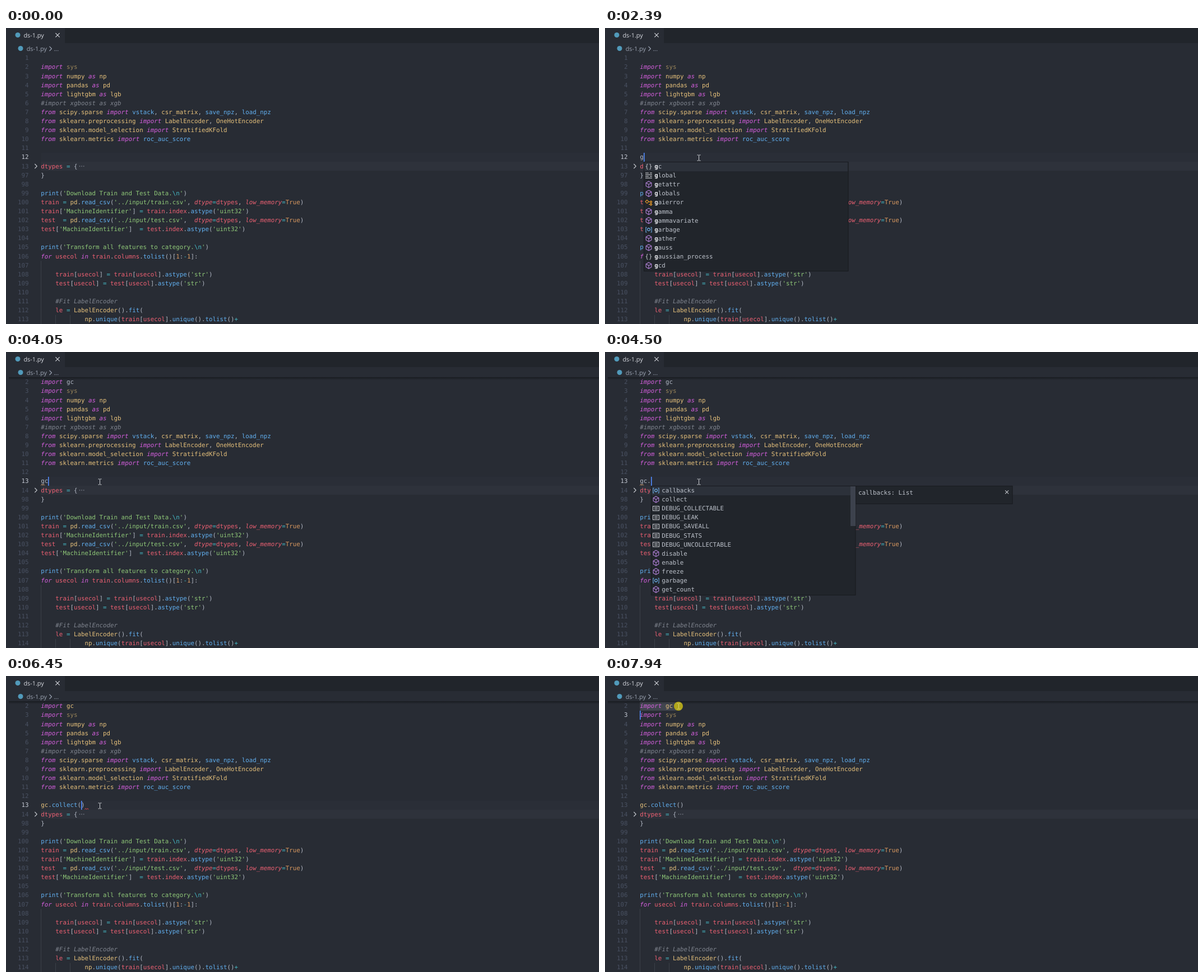
Recreate the animation shown at these times as an HTML page with a canvas. Size 1058 px wide and 529 px high, loop 8000 ms.

```html
<!DOCTYPE html>
<html lang="en">
<head>
<meta charset="utf-8">
<title>Code editor</title>
<style>
  html, body { margin: 0; height: 100%; overflow: hidden; background: #282c34; }
  canvas { display: block; width: 1058px; height: 529px; }
</style>
</head>
<body>
<canvas id="stage" width="1058" height="529"></canvas>
<script>
const c = document.getElementById('stage').getContext('2d');
c.textRendering = 'geometricPrecision';

const LOOP = 8000, W = 1058, H = 529;
const LEFT = 62.3, TOP = 45.9, CHAR = 6.515, ROW = 16.1, BASE = 11.4;
const TYPING_ROW = 11, FOLD_ROW = 12;
const MONO = '10.82px "DejaVu Sans Mono", monospace';
const SANS = '10.8px "Open Sans", sans-serif';
const col = {
  bg: '#282c34', dark: '#21252b', edge: '#181a1f', text: '#b1b7c3', bright: '#c5c8ce', dim: '#495162',
  purple: '#d55fde', yellow: '#e5c07b', blue: '#61afef', red: '#ec6072',
  green: '#8fc878', cyan: '#45b8c4', orange: '#d8985f', note: '#7f848e', faded: '#998459',
};

// Moments of the story, in ms.
const at = {
  move: 370, click: 1270, g: 2000, listA: 2390, docA: 2540, warn: 2940, bulb: 3030,
  accept: 3810, bulbOff: 4050, dot: 4260, listB: 4340, docB: 4500, known: 4650,
  pick: 5580, docPick: 5670, call: 6450, hint: 6530, close: 7460, leave: 7690, reclick: 7860, select: 7940,
};

const code = String.raw`
import sys
import numpy as np
import pandas as pd
import lightgbm as lgb
#import xgboost as xgb
from scipy.sparse import vstack, csr_matrix, save_npz, load_npz
from sklearn.preprocessing import LabelEncoder, OneHotEncoder
from sklearn.model_selection import StratifiedKFold
from sklearn.metrics import roc_auc_score


dtypes = {
}

print('Download Train and Test Data.\n')
train = pd.read_csv('../input/train.csv', dtype=dtypes, low_memory=True)
train['MachineIdentifier'] = train.index.astype('uint32')
test  = pd.read_csv('../input/test.csv',  dtype=dtypes, low_memory=True)
test['MachineIdentifier']  = test.index.astype('uint32')

print('Transform all features to category.\n')
for usecol in train.columns.tolist()[1:-1]:

    train[usecol] = train[usecol].astype('str')
    test[usecol] = test[usecol].astype('str')

    #Fit LabelEncoder
    le = LabelEncoder().fit(
            np.unique(train[usecol].unique().tolist()+`.split('\n');

const words = list => new RegExp(`^(${list.replace(/ /g, '|')})$`);
const keywords = words('import as from for in');
const types = words('numpy np pandas pd lightgbm lgb scipy sparse sklearn preprocessing ' +
  'model_selection metrics csr_matrix LabelEncoder OneHotEncoder StratifiedKFold gc');
const funcs = words('vstack save_npz load_npz roc_auc_score');

const entries = s => s.split(' ').map(e => e.split(':'));
const listA = entries('mod:gc key:global fn:getattr fn:globals cls:gaierror fn:gamma ' +
  'fn:gammavariate var:garbage fn:gather fn:gauss mod:gaussian_process fn:gcd');
const listB = entries('var:callbacks fn:collect const:DEBUG_COLLECTABLE const:DEBUG_LEAK ' +
  'const:DEBUG_SAVEALL const:DEBUG_STATS const:DEBUG_UNCOLLECTABLE fn:disable fn:enable ' +
  'fn:freeze var:garbage fn:get_count');

const rowTop = i => TOP + i * ROW;
const colX = n => LEFT + n * CHAR;
const within = (t, a, b) => t >= a && t < b;
const lerp = (a, b, p) => a + (b - a) * p;

function rect(x, y, w, h, fill) {
  c.fillStyle = fill;
  c.fillRect(x, y, w, h);
}

function frameBox(x, y, w, h, color) {
  c.strokeStyle = color;
  c.lineWidth = 1.1;
  c.strokeRect(x - w / 2, y - h / 2, w, h);
}

function text(s, x, y, fill, font = MONO) {
  c.font = font;
  c.fillStyle = fill;
  c.fillText(s, x, y);
}

function line(x1, y1, x2, y2, color, width = 1.1) {
  c.strokeStyle = color;
  c.lineWidth = width;
  c.beginPath();
  c.moveTo(x1, y1);
  c.lineTo(x2, y2);
  c.stroke();
}

// Regular polygon with its first corner at the top.
function poly(x, y, r, n, color) {
  c.strokeStyle = color;
  c.lineWidth = 1.1;
  c.beginPath();
  for (let i = 0; i < n; i++) {
    const a = 2 * Math.PI * i / n;
    c.lineTo(x + r * Math.sin(a), y - r * Math.cos(a));
  }
  c.closePath();
  c.stroke();
}

function dot(x, y, r, fill) {
  c.fillStyle = fill;
  c.beginPath();
  c.arc(x, y, r, 0, 7);
  c.fill();
}

function cross(x, y, r, color) {
  for (const s of [r, -r]) line(x - r, y - s, x + r, y + s, color);
}

function chevron(x, y, color) {
  for (const s of [4, -4]) line(x - 2, y - s, x + 2, y, color);
}

function panel(x, y, w, h) {
  rect(x, y, w, h, col.edge);
  rect(x + 1, y + 1, w - 2, h - 2, col.dark);
}

function wordColor(w, next, gcKnown) {
  if (w === 'sys') return col.faded;
  if (w === 'g' || w === 'gc' && !gcKnown) return col.text;
  if (keywords.test(w)) return col.purple;
  if (types.test(w)) return col.yellow;
  if (/^\d|True/.test(w)) return col.orange;
  return funcs.test(w) || next === '(' ? col.blue : col.red;
}

function codeLine(s, x, y, gcKnown) {
  for (const m of s.matchAll(/#.*|'[^']*'|\w+|[=+-]|[^\w\s'=+-]/g)) {
    const w = m[0], next = s[m.index + w.length];
    const put = (part, n, color, italic) =>
      text(part, x + n * CHAR, y, color, (italic ? 'italic ' : '') + MONO);
    if (w[0] === '#') put(w, m.index, col.note, true);
    else if (w[0] === "'") {
      let n = m.index;
      for (const part of w.split(/(\\n)/)) {
        put(part, n, part === '\\n' ? col.cyan : col.green);
        n += part.length;
      }
    }
    else if (/\w/.test(w))
      put(w, m.index, wordColor(w, next, gcKnown), keywords.test(w) || next === '=');
    else put(w, m.index, /[=+-]/.test(w) ? col.cyan : col.text);
  }
}

const icons = {
  mod: (x, y) => text('{}', x - CHAR, y + 4, col.bright),
  key(x, y) {
    for (let i = 0; i < 4; i++) {
      rect(x - 6, y - 5 + i * 3, i % 2 ? 12 : 6, 1.2, col.bright);
      if (i % 2 === 0) rect(x + 2, y - 5 + i * 3, 4, 1.2, col.bright);
    }
  },
  fn(x, y) {
    const color = '#b180d7';
    poly(x, y, 5.6, 6, color);
    for (let i = 0; i < 3; i++) {
      const a = 2 * Math.PI * i / 3;
      line(x, y, x + 5.6 * Math.sin(a), y + 5.6 * Math.cos(a), color);
    }
  },
  cls(x, y) {
    const color = '#ee9d28';
    poly(x - 3, y - 1.5, 3, 4, color);
    for (const dy of [-1, 3.5]) {
      poly(x + 4, y + dy, 1.8, 4, color);
      line(x, y + dy, x + 2, y + dy, color);
    }
  },
  var(x, y) {
    const color = '#75beff';
    text('[', x - 8, y + 3.5, color);
    text(']', x + 1.5, y + 3.5, color);
    poly(x, y, 2.6, 6, color);
  },
  const(x, y) {
    frameBox(x, y, 11, 8, col.bright);
    for (const dy of [-1.3, 1.3]) line(x - 3, y + dy, x + 3, y + dy, col.bright);
  },
};

function suggestions(x, items, match, selected, thumb) {
  panel(x, 239, 365.5, 196);
  rect(x + 1, 240 + selected * ROW, 363, ROW, '#2c313a');
  items.forEach(([kind, name], i) => {
    const y = rowTop(FOLD_ROW + i) + BASE + .5, tx = x + 19.3;
    icons[kind](x + 9, y - 3.6);
    text(name.slice(0, match), tx, y, '#e8eaee', 'bold ' + MONO);
    text(name.slice(match), tx + match * CHAR, y, '#bcc1ca');
  });
  rect(x + 356, 240, 9, thumb, '#3d424d');
}

function details(x, h) {
  panel(x, 239, 280.5, h);
  cross(x + 270, 250.3, 3, col.bright);
}

function squiggle(n, color) {
  for (let i = 0; i < 4; i++) {
    const x = colX(n) + i * 1.7, s = i % 2 ? 1 : -1;
    line(x, 237.5 - s, x + 1.7, 237.5 + s, color, 1);
  }
}

// The pointer moves in visible steps and slows down as it arrives.
function pointerAt(t) {
  const steps = (from, ms, n) => Math.min(1, (Math.floor((t - from) / ms)) / n);
  const home = [167, 232];
  if (t < at.leave) {
    const p = steps(at.move, 78, 10), ease = 1 - (1 - p) ** 2;
    const overshoot = p < 1 ? -15 * p : 0;
    return [lerp(912, home[0], ease) + overshoot, lerp(388, home[1], ease)];
  }
  const p = 1 - (1 - steps(at.leave - 80, 80, 3)) ** 3;
  return [lerp(home[0], 131, p), lerp(home[1], 54, p)];
}

function pointer(t) {
  if (t < at.move) return;
  const [x, y] = pointerAt(t);
  const click = within(t, at.click, at.click + 90) || t >= at.reclick;
  const color = click ? '#d8cf6a' : '#d0d3d8';
  if (click) dot(x, y, 8, '#b0a51c');
  rect(x, y - 4.5, 1, 9, color);
  for (const dy of [-5.5, 4.5])
    for (const dx of [-2.5, 1]) rect(x + dx, y + dy, 2.5, 1, color);
}

const typed = t => t < at.g ? '' : t < at.accept ? 'g' : t < at.dot ? 'gc' : t < at.call ? 'gc.' : 'gc.collect()';

// Every edit restarts the blinking.
function caret(t) {
  const last = [at.click, at.g, at.accept, at.listB, at.call, at.close, at.reclick].findLast(e => t >= e);
  if (last === undefined || Math.floor((t - last - 65) / 475) % 2 === 1) return;
  let row = TYPING_ROW, n = typed(t).length;
  if (within(t, at.call, at.close)) n--;
  if (t >= at.reclick) [row, n] = t < at.select ? [0, 9] : [1, 0];
  rect(Math.round(colX(n)), Math.round(rowTop(row)), 1.6, 16, '#528bff');
}

function header() {
  rect(0, 0, W, 27, col.dark);
  rect(0, 0, 105, 27, col.bg);
  dot(21, 12.5, 4.5, '#519aba');
  text('ds-1.py', 31.5, 17, '#d7dae0', SANS);
  cross(92, 12.8, 3.6, '#d7dae0');
  dot(26, 36.5, 4.5, '#519aba');
  text('ds-1.py', 36.7, 41, '#9da5b4', SANS);
  chevron(79.5, 37, '#9da5b4');
  text('...', 85.5, 41, '#9da5b4', SANS);
}

function lightbulb(y) {
  dot(69, y, 4.3, '#ffcc00');
  rect(67, y + 3, 4, 4.5, '#ffcc00');
  rect(67, y + 5, 4, .8, col.bg);
}

function editor(t) {
  const imported = t >= at.accept;
  const active = t < at.reclick ? TYPING_ROW : t < at.select ? 0 : 1;
  if (t < at.select) rect(LEFT, Math.round(rowTop(active)), W, 16, '#2a2e37');
  else rect(LEFT, TOP, 10 * CHAR, 16, '#41454f');
  rect(LEFT, 239, W, 16, '#2e323b');

  c.textAlign = 'right';
  for (let i = 0; i < 30; i++) {
    const n = i + (i > FOLD_ROW ? 84 : 1) + imported;
    text(n, 40.5, rowTop(i) + BASE, i === active ? '#c3c8d2' : col.dim);
  }
  c.textAlign = 'left';
  chevron(53.3, 247, col.bright);

  for (let i = 0; i < 3; i++) {
    rect(Math.floor(colX(i * 4)), rowTop(i ? 29 : 23), 1, H, '#3b4048');
    dot(131.5 + i * 3.6, 247, .8, '#8b919c');
  }

  code.forEach((s, i) => {
    if (i === 0 && imported) s = 'import gc';
    if (i === TYPING_ROW) s = typed(t);
    codeLine(s, LEFT, rowTop(i) + BASE, t >= at.known);
  });

  if (within(t, at.warn, at.docPick)) squiggle(0, '#d19a66');
  if (within(t, at.call, at.close)) squiggle(12, '#e0474c');
  if (within(t, at.bulb, at.bulbOff)) lightbulb(rowTop(imported ? 9 : 10) + 5);
  if (imported) {
    const g = c.createLinearGradient(0, 45, 0, 50);
    g.addColorStop(0, 'rgba(0,0,0,.38)');
    g.addColorStop(1, 'rgba(0,0,0,0)');
    rect(5, 45, W, 5, g);
  }
}

function popups(t) {
  if (within(t, at.listA, at.accept)) {
    const full = t >= at.docA;
    suggestions(69, listA, 1, 0, full ? 16 : 0);
    if (full) {
      details(434, 54);
      text('Auto-import', 439, 254.6, '#8f96a3');
      codeLine('import gc', 439, 283.6, false);
    }
  }
  if (within(t, at.listB, at.call)) {
    const full = t >= at.docB;
    suggestions(82, listB, 0, t < at.pick ? 0 : 1, full ? 71 : 0);
    if (full) {
      details(447, 33);
      text(t < at.docPick ? 'callbacks: List' : 'collect(generation: int=...) -> int', 452, 254.6, '#bcc1ca');
    }
  }
  if (within(t, at.hint, at.reclick)) {
    const x = 142, y = 216, param = 'generation: int=...';
    panel(134, 199, 211, 27);
    text('(', x, y, '#bcc1ca');
    text(param, x + CHAR, y, col.blue, 'bold ' + MONO);
    text(') -> int', x + (param.length + 1) * CHAR, y, '#bcc1ca');
  }
}

const start = performance.now();
function frame() {
  const t = Math.max(0, performance.now() - start) % LOOP;
  rect(0, 0, W, H, col.bg);
  header();
  editor(t);
  caret(t);
  popups(t);
  pointer(t);
  requestAnimationFrame(frame);
}
frame();
</script>
</body>
</html>
```
